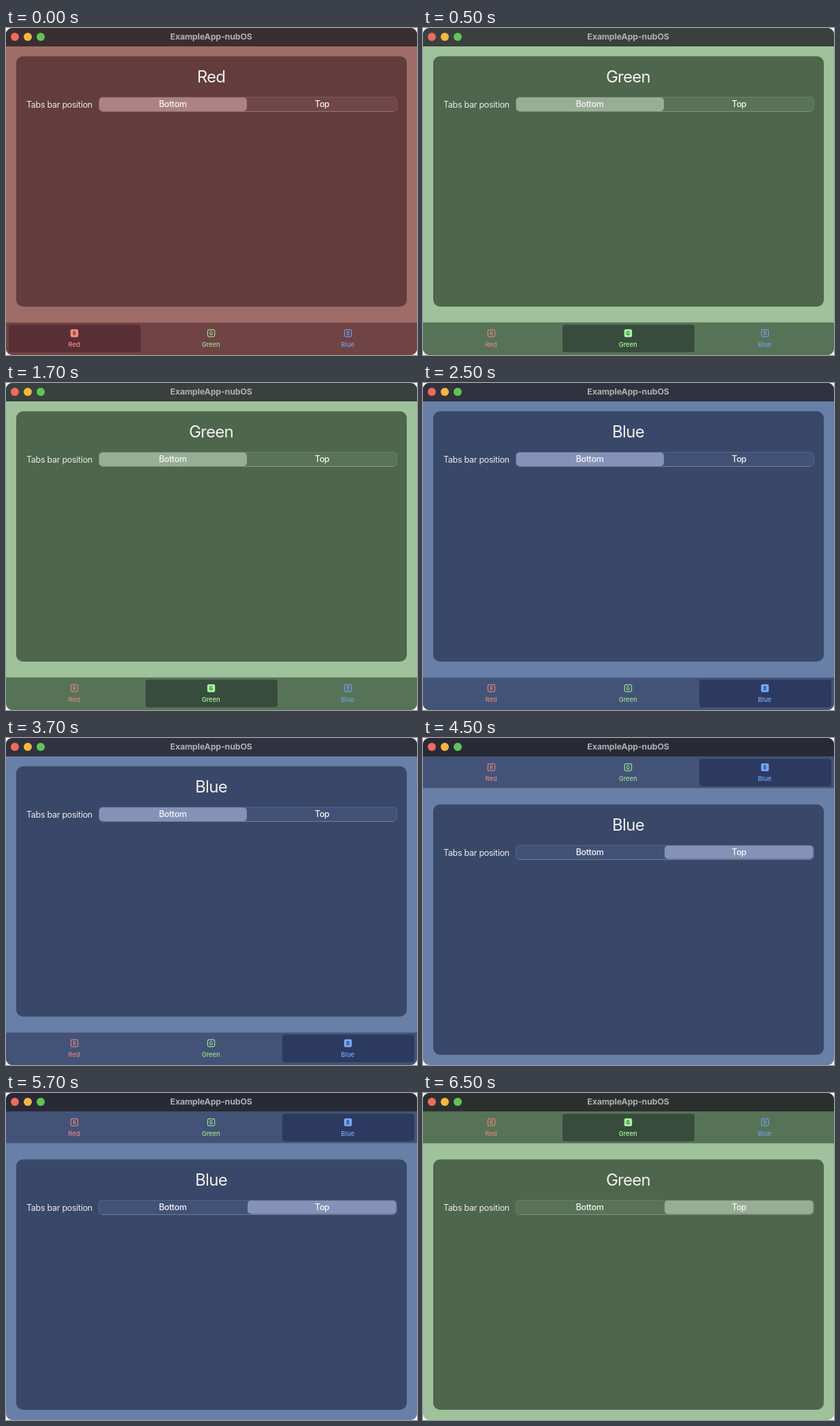
Animation, 604 px wide and 480 px high, one loop 8000 ms. Source, as an HTML page with a canvas:

```html
<!DOCTYPE html>
<html lang="en">
<head>
<meta charset="utf-8">
<title>Tabs bar</title>
<style>
html, body { margin: 0; width: 100%; height: 100%; overflow: hidden; background: #fff; }
canvas { display: block; }
</style>
</head>
<body>
<canvas id="stage" width="604" height="480"></canvas>
<script>
const ctx = document.getElementById('stage').getContext('2d');
const FONT = 'Inter, "Open Sans", sans-serif';

const themes = [
  { name: 'Red', accent: '#e0837b', active: '#ff8b81', title: '#3b2e31', bg: '#a06c67',
    card: '#633c3e', bar: '#704345', tab: '#582f35', thumb: '#ad8284', trough: '#6f4749' },
  { name: 'Green', accent: '#98e08f', active: '#a5fb9c', title: '#3a403d', titleTop: '#2b302e', bg: '#9fc19b',
    card: '#4e664b', bar: '#577357', tab: '#384c3d', thumb: '#98ae94', trough: '#587356' },
  { name: 'Blue', accent: '#6f9fe6', active: '#74a9ff', title: '#30323f', titleTop: '#282a36', bg: '#687fa7',
    card: '#394868', bar: '#435378', tab: '#2d3a60', thumb: '#8492b7', trough: '#425277' }
];

// start time, selected tab, bar on top
const scenes = [[0, 0, false], [500, 1, false], [2500, 2, false], [4500, 2, true], [6500, 1, true]];
const LOOP = 8000;

function box(x, y, w, h, r, color) {
  ctx.beginPath();
  ctx.roundRect(x, y, w, h, r);
  ctx.fillStyle = color;
  ctx.fill();
}

function outline(x, y, w, h, r, color, width = 1) {
  ctx.beginPath();
  ctx.roundRect(x, y, w, h, r);
  ctx.strokeStyle = color;
  ctx.lineWidth = width;
  ctx.stroke();
}

function text(str, x, y, size, color, weight = 400, spacing = 0, align = 'center') {
  ctx.font = `${weight} ${size}px ${FONT}`;
  ctx.letterSpacing = spacing + 'px';
  ctx.textAlign = align;
  ctx.fillStyle = color;
  ctx.fillText(str, x, y);
}

function drawTitleBar(color) {
  box(0, 0, 604, 27, 0, color);
  ['#ed6b5f', '#f4b740', '#60c454'].forEach((c, i) => box(7 + 19 * i, 7, 12, 12, 6, c));
  text('ExampleApp-nubOS', 301.5, 17, 12.4, '#b1adaf', 700, -0.15);
}

function drawCard(theme, top) {
  ctx.save();
  ctx.translate(0, top ? 56 : 0);
  box(15, 41.5, 574, 367.5, 10, theme.card);
  text(theme.name, 301.5, 80, 24, '#f3efef', 400, -0.7);
  text('Tabs bar position', 30, 117, 12.5, '#ece9ea', 400, -0.28, 'left');
  box(136.5, 101.5, 438, 21, 5, theme.trough);
  outline(136.5, 101.5, 438, 21, 5, 'rgba(255,255,255,0.13)');
  box(141, 122, 429, 1, 0, 'rgba(255,255,255,0.17)');
  if (top) box(355, 102, 218.5, 19.5, 5, theme.thumb);
  else box(137, 102, 217, 20, 5, theme.thumb);
  text('Bottom', 245, 116, 12.4, '#f7f5f5', 500, -0.28);
  text('Top', 464.5, 116, 12.4, '#f7f5f5', 500, -0.28);
  ctx.restore();
}

function drawTabs(theme, top) {
  ctx.save();
  ctx.translate(0, top ? -405 : 0);
  box(0, 432, 604, 48, 0, theme.bar);
  box(0, top ? 478 : 432, 604, 1, 0, 'rgba(255,255,255,0.1)');
  if (top) box(0, 479, 604, 1, 0, theme.bg);
  themes.forEach((t, i) => {
    const x = 100.5 + 201 * i;
    const on = t === theme;
    const color = on ? t.active : t.accent;
    if (on) box(4 + 201 * i, 435.5, 194, 40.5, 4, theme.tab);
    if (on) box(x - 5.7, 442.3, 11.4, 11.4, 2.2, color);
    else outline(x - 5.1, 442.9, 10.2, 10.2, 1.8, color, 1.2);
    text(t.name[0], x, 450.5, 7, on ? theme.tab : color, 700);
    text(t.name, x - 0.3, 467.7, 9.4, color, 500);
  });
  ctx.restore();
}

function draw(now) {
  const time = now % LOOP;
  const [, index, top] = scenes.findLast(s => s[0] <= time);
  const theme = themes[index];
  ctx.clearRect(0, 0, 604, 480);
  ctx.save();
  ctx.beginPath();
  ctx.roundRect(0, 0, 604, 480, 9);
  ctx.clip();
  box(0, 0, 604, 480, 0, theme.bg);
  drawCard(theme, top);
  drawTabs(theme, top);
  drawTitleBar(top ? theme.titleTop : theme.title);
  ctx.restore();
  requestAnimationFrame(draw);
}
requestAnimationFrame(draw);
</script>
</body>
</html>
```
